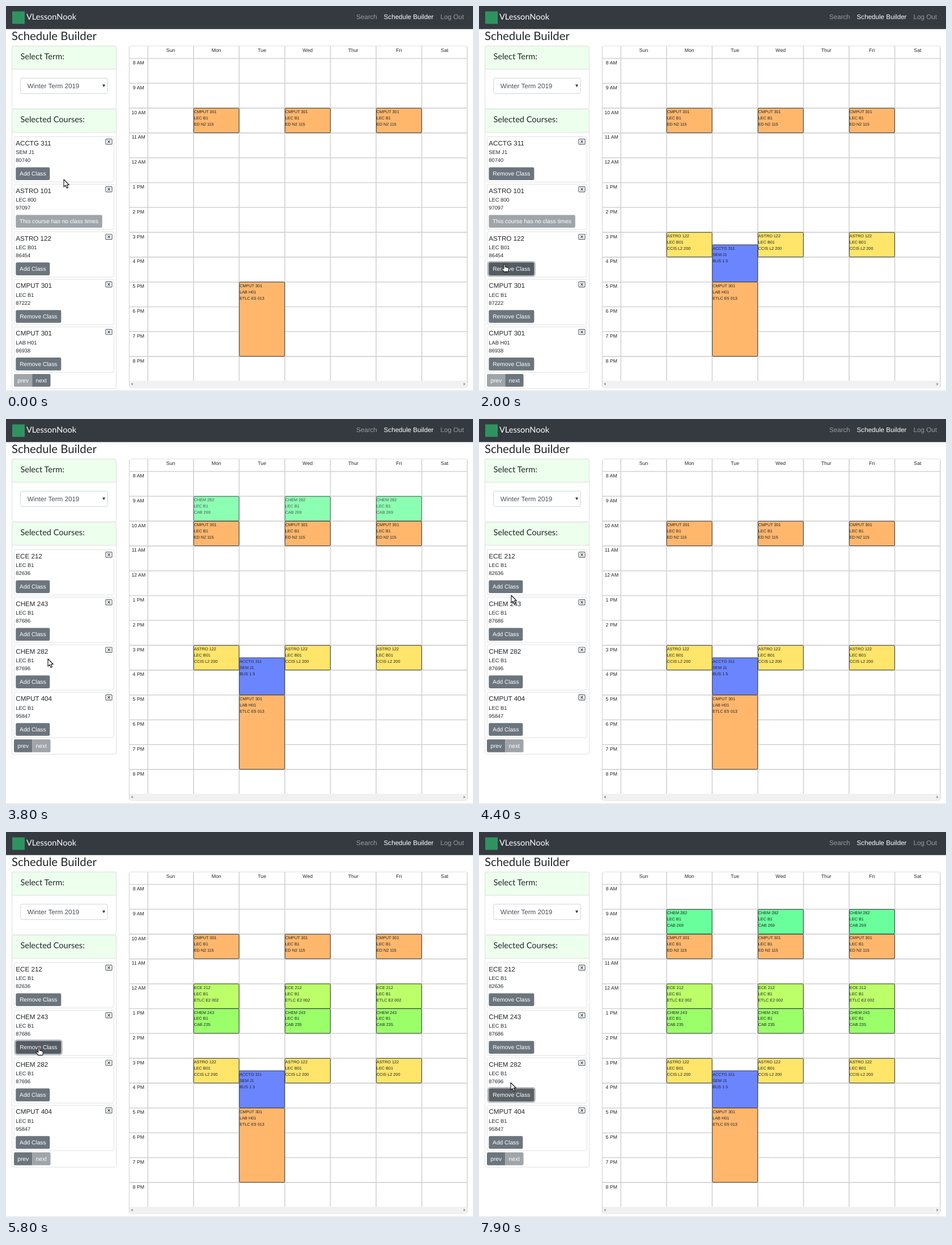
Animation of 824x679 px, one loop 8000 ms. Source, as an HTML page:

```html
<!DOCTYPE html>
<html lang="en">
<head>
<meta charset="utf-8">
<title>Schedule Builder</title>
<style>
  html, body { margin: 0; width: 100%; height: 100%; overflow: hidden; background: #fff; }
  svg { display: block; width: 824px; height: 679px; }
  text { font-family: "Liberation Sans", Arial, sans-serif; fill: #212529; text-rendering: geometricPrecision; white-space: pre; }
  .lato { font-family: Lato, sans-serif; }
  .mid { text-anchor: middle; }
</style>
</head>
<body>
<svg viewBox="0 0 824 679"><g id="base"></g><g id="live"></g></svg>
<script>
const LOOP = 8000, TICK = 100;
const GREY = '#6c757d', EDGE = '#dfdfdf';
const COL0 = 250.3, COL = 80.55, ROW0 = 92.5, ROW = 43.8, CARD = 83.9;
const MWF = [1, 3, 5];

// click: tick at which the class is added; focus: tick at which its button is pressed
const courses = [
  { name: 'ACCTG 311', sec: 'SEM J1', id: 80740, days: [2], from: 15.5, to: 17, room: 'BUS 1 5', color: '#6b85ff', focus: 9, click: 9, blur: 19 },
  { name: 'ASTRO 101', sec: 'LEC 800', id: 97097 },
  { name: 'ASTRO 122', sec: 'LEC B01', id: 86454, days: MWF, from: 15, to: 16, room: 'CCIS L2 200', color: '#ffe569', focus: 19, click: 19, blur: 35 },
  { name: 'CMPUT 301', sec: 'LEC B1', id: 87222, days: MWF, from: 10, to: 11, room: 'ED N2 115', color: '#ffb76c', click: 0 },
  { name: 'CMPUT 301', sec: 'LAB H01', id: 86938, days: [2], from: 17, to: 20, room: 'ETLC E5 013', color: '#ffb76c', click: 0 },
  { name: 'ECE 212', sec: 'LEC B1', id: 82636, days: MWF, from: 12, to: 13, room: 'ETLC E2 002', color: '#bdff69', focus: 48, click: 48, blur: 56 },
  { name: 'CHEM 243', sec: 'LEC B1', id: 87686, days: MWF, from: 13, to: 14, room: 'CAB 235', color: '#9aff69', focus: 56, click: 58, blur: 67 },
  { name: 'CHEM 282', sec: 'LEC B1', id: 87696, days: MWF, from: 9, to: 10, room: 'CAB 269', color: '#69ff9c', focus: 67, click: 67, blur: 80 },
  { name: 'CMPUT 404', sec: 'LEC B1', id: 95847, days: MWF, click: 99 }
];
const PAGE_FLIP = 35;

// pointer path: tick, x, y
const path = [
  [0, 102, 306], [2, 102, 306], [4, 78, 299], [6, 59, 297], [9, 59, 297],
  [17, 45, 458], [18, 45, 458], [19, 45, 456], [20, 45, 456], [24, 52, 551],
  [32, 52, 551], [34, 62, 655], [35, 62, 660], [36, 66, 590], [37, 71, 458],
  [38, 74, 423], [39, 74, 416], [40, 74, 416], [42, 82, 370], [44, 57, 311],
  [46, 52, 297], [48, 52, 297], [49, 52, 298], [56, 58, 381], [58, 58, 381],
  [60, 62, 419], [61, 62, 419], [62, 71, 457], [63, 74, 463], [76, 74, 463],
  [78, 61, 454], [79, 56, 442], [80, 56, 442]
];

const rect = (x, y, w, h, fill, extra = '') =>
  `<rect x="${x}" y="${y}" width="${w}" height="${h}" fill="${fill}" ${extra}/>`;
const text = (x, y, size, str, extra = '') =>
  `<text x="${x}" y="${y}" font-size="${size}" ${extra}>${str}</text>`;
const line = (d, color, width) =>
  `<path d="${d}" fill="none" stroke="${color}" stroke-width="${width}"/>`;
const box = (x, y, w, h, r = 3, stroke = EDGE) =>
  rect(x, y, w, h, '#fff', `rx="${r}" stroke="${stroke}"`);

function panelHead(y, label) {
  return `<path d="M10.5 ${y + 41}V${y + 3}q0-3 3-3H191.500q3 0 3 3V${y + 41}z" fill="#edffed" stroke="${EDGE}"/>` +
    text(25.4, y + 23, 14.55, label, 'class="lato"');
}

function drawBase() {
  let s = rect(0, 0, 824, 40.7, '#343a40') + rect(11, 9.5, 22, 22, '#2f9360') +
    text(36, 24.2, 14.55, 'VLessonNook', 'class="lato" style="fill:#fff"') +
    text(618, 22.8, 11.64, 'Search', 'style="fill:#999da0"') +
    text(666.6, 22.8, 11.64, 'Schedule Builder', 'style="fill:#fff"') +
    text(766.5, 22.8, 11.64, 'Log Out', 'style="fill:#999da0"') +
    text(10, 59.8, 20.37, 'Schedule Builder', 'class="lato"') +
    line('M0 678.5H824', '#e4e4e4', 1);

  s += box(217.5, 70.5, 596.5, 602.5);
  let grid = `M${COL0} 71V661`;
  ['Sun', 'Mon', 'Tue', 'Wed', 'Thur', 'Fri', 'Sat'].forEach((day, i) => {
    const x = COL0 + COL * i;
    if (i) grid += `M${x} 71V661`;
    s += text(x + COL / 2, 80.8, 8.73, day, 'class="mid"');
  });
  for (let i = 0; i < 13; i++) {
    const y = ROW0 + ROW * i, hour = 8 + i;
    grid += `M218 ${y}H814`;
    s += text(233.8, y + 10.5, 8.73, hour > 12 ? `${hour - 12} PM` : `${hour} AM`, 'class="mid"');
  }
  s += line(grid, '#d2d2d2', 1.6) + line('M217.500 72V671M813.700 72V671', '#d2d2d2', 1.2);
  s += rect(218, 661, 595.5, 11.5, '#f1f1f1') +
    '<path d="M223.500 664.300v5l-3-2.500zM807.500 664.300v5l3-2.500z" fill="#8c8c8c"/>';
  return s;
}

function pointer(tick) {
  const i = Math.max(1, path.findIndex(p => p[0] >= tick));
  const [t0, x0, y0] = path[i - 1], [t1, x1, y1] = path[i];
  const k = (tick - t0) / (t1 - t0);
  return { x: x0 + (x1 - x0) * k, y: y0 + (y1 - y0) * k };
}

const pageOf = tick => tick < PAGE_FLIP ? courses.slice(0, 5) : courses.slice(5);
const inside = (p, x, y, w, h) => p.x >= x && p.x <= x + w && p.y >= y && p.y <= y + h;

function hovered(tick) {
  const p = pointer(Math.max(0, tick));
  return pageOf(tick).find((c, i) =>
    c.days && inside(p, 17, 284.5 + CARD * i, tick >= c.click ? 80 : 60, 22.6));
}

function button(x, y, w, label, fill, ring = 0) {
  const glow = ring ? rect(x - 1.2, y - 1.2, w + 2.4, 25, 'none',
    `rx="3.500" stroke="${GREY}" stroke-width="2.400" stroke-opacity="${ring}"`) : '';
  return glow + rect(x, y, w, 22.6, fill, 'rx="2.300"') +
    text(x + w / 2, y + 14.6, 10.18, label, 'class="mid" style="fill:#fff"');
}

function courseCard(c, i, tick) {
  const y = CARD * i;
  let fill = GREY, label = 'Add Class', width = 60, ring = 0;
  if (!c.days) {
    [fill, label, width] = ['#a0a5aa', 'This course has no class times', 152.5];
  } else {
    if (tick >= c.click) [label, width] = ['Remove Class', 80];
    const focused = tick >= c.focus && tick < c.blur;
    if (focused) ring = tick === c.focus ? 0.2 : 0.5;
    if (hovered(tick) === c || focused && hovered(tick - 1) === c)
      fill = focused && tick - c.focus < 3 ? '#545b62' : '#5a6268';
  }
  return box(14.3, 230.3 + y, 176, 80) +
    text(17.3, 245.7 + y, 11.64, c.name) +
    text(17.3, 261 + y, 9.31, c.sec) +
    text(17.3, 275 + y, 9.31, c.id) +
    rect(176, 234.7 + y, 11, 9.2, '#fff', 'rx="1" stroke="#5d666e" stroke-width="1.200"') +
    line(`M179.300 ${237 + y}l4.400 4.600m0-4.600l-4.400 4.600`, '#4c555d', 1.3) +
    button(17.3, 284.5 + y, width, label, fill, ring);
}

function pager(y, tick) {
  const first = tick < PAGE_FLIP, off = '#a0a5aa';
  const over = first && inside(pointer(tick), 46, y, 32.5, 22.6);
  const half = (d, fill) => `<path d="${d}" fill="${fill}"/>`;
  const label = (x, str) => text(x, y + 14.6, 10.18, str, 'class="mid" style="fill:#fff"');
  return half(`M46.200 ${y}H16.300q-2.300 0-2.300 2.300v18q0 2.300 2.300 2.300h29.900z`, first ? off : GREY) +
    half(`M46.200 ${y}h30q2.300 0 2.300 2.300v18q0 2.300-2.300 2.300h-30z`, first ? (over ? '#5a6268' : GREY) : off) +
    label(30.2, 'prev') + label(62.2, 'next');
}

function sidebar(tick) {
  const list = pageOf(tick), extra = CARD * (list.length - 5);
  return box(10.5, 70.5, 184, 110.8) + panelHead(70.5, 'Select Term:') +
    box(25.7, 127.2, 153.6, 27.2, 3, '#ced4da') +
    text(37.8, 144.7, 11.64, 'Winter Term 2019', 'style="fill:#495057"') +
    '<path d="M170 138.500h5.200l-2.600 4.800z" fill="#343a40"/>' +
    box(10.5, 181.8, 184, 493.2 + extra) + panelHead(181.8, 'Selected Courses:') +
    list.map((c, i) => courseCard(c, i, tick)).join('') + pager(649 + extra, tick);
}

function events(tick) {
  // a preview lingers for one tick after the pointer leaves the button
  const previews = [hovered(tick), hovered(tick - 1)];
  let s = '';
  for (const c of courses) {
    const added = tick >= c.click;
    if (!c.room || !added && !previews.includes(c)) continue;
    const y = ROW0 + ROW * (c.from - 8), h = ROW * (c.to - c.from);
    for (const day of c.days) {
      const x = COL0 + COL * day;
      const lines = [c.name, c.sec, c.room].map((str, i) => text(x + 0.8, y + 9 + 10.91 * i, 7.27, str));
      s += `<g opacity="${added ? 1 : 0.77}">` +
        rect(x + 0.3, y + 0.1, COL - 0.5, h - 0.3, c.color, 'rx="1.500" stroke="#343a40"') + lines.join('') + '</g>';
    }
  }
  return s;
}

function cursor(tick) {
  const p = pointer(tick);
  const onNext = tick < PAGE_FLIP && inside(p, 46, 649, 32.5, 22.6);
  const shape = hovered(tick) || onNext
    ? 'M-1.200 7.500V.8q0-1.300 1.200-1.300t1.200 1.300V4.300q1.800-.6 2.300.5q1.700-.5 2.100.7q1.700-.1 1.700 1.500v2.300q0 1.700-1 3.300H-1.200Q-2.800 9.900-4.800 7.600q-.3-1.500 1.200-1.400z'
    : 'M0 0V13.200L3 10.400L5.200 15.300L7.500 14.300L5.300 9.500H9.300Z';
  return `<path d="${shape}" transform="translate(${p.x} ${p.y})" fill="#fff" stroke="#111" stroke-width="1.100" stroke-linejoin="round"/>`;
}

const live = document.getElementById('live');
document.getElementById('base').innerHTML = drawBase();
let shown = -1;

function frame() {
  const tick = Math.floor(performance.now() % LOOP / TICK);
  if (tick !== shown) {
    shown = tick;
    live.innerHTML = sidebar(tick) + events(tick) + cursor(tick);
  }
  requestAnimationFrame(frame);
}
frame();
</script>
</body>
</html>
```
